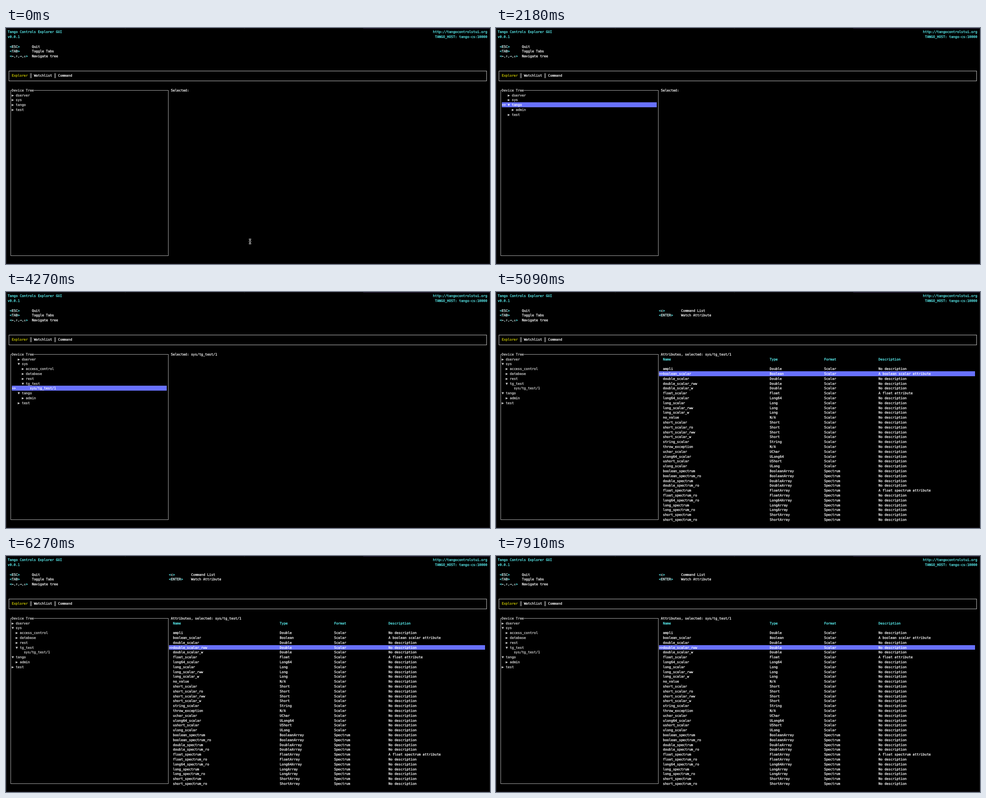
Write an HTML page that moves like this. It is 1069x524 px and loops after 8000 ms.

```html
<!DOCTYPE html>
<html lang="en">
<head>
<meta charset="utf-8">
<title>Tango Controls Explorer GUI</title>
<style>
html, body { margin: 0; width: 100%; height: 100%; overflow: hidden; background: #000; }
svg { display: block; width: 1069px; height: 524px; }
text { font: 7.39px "DejaVu Sans Mono", monospace; white-space: pre; text-rendering: geometricPrecision;
  stroke: currentColor; stroke-width: .25px; fill: currentColor; }
tspan { fill: currentColor; stroke: currentColor; }
</style>
</head>
<body>
<svg id="screen" viewBox="0 0 1069 524"></svg>
<script>
const LOOP = 8000, CW = 4.45, RH = 10.799;
const CYAN = '#60fdff', PALE = '#e0ffff', WHITE = '#fff', GRAY = '#d4d4d4', YELLOW = '#c7c400', BLUE = '#6871ff';
const X = col => 3.8 + CW * col;
const Y = row => 8.7 + RH * row;
const esc = s => s.replace(/&/g, '&amp;').replace(/</g, '&lt;').replace(/>/g, '&gt;');

// Everything is placed on a terminal grid of columns and rows
const putRaw = (col, row, inner, color, end) =>
  `<text x="${X(col)}" y="${Y(row) + 2.6}" color="${color}"${end ? ' text-anchor="end"' : ''}>${inner}</text>`;
const put = (col, row, s, color = WHITE, end = false) => putRaw(col, row, esc(s), color, end);
const putKey = (col, row, key) => putRaw(col, row, `&lt;<tspan color="${PALE}">${key}</tspan>&gt;`, CYAN);
const rect = (x, y, w, h, color) => `<rect x="${x}" y="${y}" width="${w}" height="${h}" fill="${color}"/>`;
const bar = (c0, c1, row) => {
  const [x0, x1, y0, y1] = [X(c0), X(c1), Y(row - .5), Y(row + .5)].map(Math.round);
  return rect(x0, y0, x1 - x0, y1 - y0, BLUE);
};
const snap = v => Math.round(v) + .5;
const frame = (c0, r0, c1, r1, color) => {
  const x = snap(X(c0 + .5)), y = snap(Y(r0));
  return `<rect x="${x}" y="${y}" width="${snap(X(c1 + .5)) - x}" height="${snap(Y(r1)) - y}" fill="none" stroke="${color}"/>`;
};

const TREE = [
  ['dserver', 0], ['sys', 0],
  ['access_control', 1, 'sys'], ['database', 1, 'sys'], ['rest', 1, 'sys'], ['tg_test', 1, 'sys'],
  ['sys/tg_test/1', 2, 'tg_test'],
  ['tango', 0], ['admin', 1, 'tango'], ['test', 0]
];

const SCALARS = `ampli boolean_scalar double_scalar double_scalar_rww double_scalar_w float_scalar
  long64_scalar long_scalar long_scalar_rww long_scalar_w no_value short_scalar short_scalar_ro
  short_scalar_rww short_scalar_w string_scalar throw_exception uchar_scalar ulong64_scalar
  ushort_scalar ulong_scalar`.split(/\s+/);
const SPECTRA = `boolean_spectrum boolean_spectrum_ro double_spectrum double_spectrum_ro
  float_spectrum float_spectrum_ro long64_spectrum_ro long_spectrum long_spectrum_ro
  short_spectrum short_spectrum_ro`.split(/\s+/);
const TYPES = { ampli: 'Double', no: 'N/A', throw: 'N/A', uchar: 'UChar', ulong64: 'ULong64', ushort: 'UShort', ulong: 'ULong' };
const NOTES = {
  boolean_scalar: 'A boolean scalar attribute',
  float_scalar: 'A float attribute',
  float_spectrum: 'A float spectrum attribute'
};

// Each step changes part of the state from its time on
const STEPS = [
  [0, { tab: 0, open: [], node: '', attr: -1, cursor: true, value: '254.11903842716052' }],
  [90, { node: 'dserver', cursor: false }],
  [180, { node: 'sys' }],
  [360, { node: 'tango' }],
  [550, { open: ['tango'] }],
  [1000, { node: 'admin' }],
  [2180, { node: 'tango' }],
  [2640, { node: 'sys' }],
  [2910, { open: ['tango', 'sys'] }],
  [3270, { node: 'access_control' }],
  [3450, { node: 'database' }],
  [3550, { node: 'rest' }],
  [3730, { node: 'tg_test' }],
  [3910, { open: ['tango', 'sys', 'tg_test'] }],
  [4270, { node: 'sys/tg_test/1' }],
  [4550, { node: '', attr: 0 }],
  [5000, { attr: 1 }],
  [5180, { attr: 2 }],
  [5450, { attr: 3 }],
  [5640, { attr: 4 }],
  [5730, { attr: 5 }],
  [6000, { attr: 4 }],
  [6180, { attr: 3 }],
  [6450, { tab: 1 }],
  [6730, { value: '255.02581475263761' }],
  [7730, { tab: 2 }],
  [7910, { tab: 0 }]
];

function header(s) {
  const keys = (col, gap, list) => list.map(([key, label], i) =>
    putKey(col, 3 + i, key) + put(col + gap, 3 + i, label)).join('');
  const left = [['ESC', 'Quit'], ['TAB', 'Toggle Tabs']];
  if (s.tab !== 1) left.push(['←,↑,→,↓', 'Navigate tree']);
  let out = put(0, 0, 'Tango Controls Explorer GUI', CYAN) + put(0, 1, 'v0.0.1', CYAN) +
    put(238, 0, 'http://tangocontrolstui.org', CYAN, true) +
    put(238, 1, 'TANGO_HOST: tango-cs:10000', CYAN, true) + keys(1, 11, left);
  if (s.tab === 0 && s.attr >= 0)
    out += keys(80, 11, [['c', 'Command List'], ['ENTER', 'Watch Attribute']]);
  out += frame(0, 8, 237, 10, '#c0c0c0');
  [['Explorer', 2], ['Watchlist', 13], ['Command', 25]].forEach(([name, col], i) => {
    out += put(col, 9, name, i === s.tab ? YELLOW : WHITE);
    if (i) for (const dx of [-1.5, .7]) out += rect(X(col - 1.5) + dx, 100.5, .9, RH, GRAY);
  });
  return out;
}

function tree(s) {
  let out = frame(1, 12, 79, 46, '#a8a8a8') + rect(X(2), 133, CW * 11, RH, '#000') + put(2, 12, 'Device Tree', GRAY);
  const shown = TREE.filter(([, , parent]) => !parent || s.open.includes(parent));
  shown.forEach(([name, depth], i) => {
    const row = 13 + i, on = name === s.node;
    const mark = depth === 2 ? ' ' : s.open.includes(name) ? '▼' : '▶';
    const col = 2 + (s.node ? 3 : 0) + depth * 2, color = on ? WHITE : GRAY;
    if (on) out += bar(2, 79, row) + put(2, row, '>>');
    out += put(col, row, mark, color) + put(col + 2, row, name, color);
  });
  return out;
}

function attributes(s) {
  const cols = [82, 135, 162, 189];
  const line = (row, cells, color) => cells.map((c, i) => put(cols[i], row, c, color)).join('');
  let out = put(81, 12, 'Attributes, selected: sys/tg_test/1') +
    line(13, ['Name', 'Type', 'Format', 'Description'], CYAN);
  [...SCALARS, ...SPECTRA].forEach((name, i) => {
    const base = name.split('_')[0], list = i >= SCALARS.length;
    const type = (TYPES[base] || base[0].toUpperCase() + base.slice(1)) + (list ? 'Array' : '');
    if (i === s.attr) out += bar(80, 237, 15 + i) + put(80, 15 + i, '>>');
    out += line(15 + i, [name, type, list ? 'Spectrum' : 'Scalar', NOTES[name] || 'No description']);
  });
  return out;
}

const explorer = s => tree(s) + (s.attr >= 0 ? attributes(s)
  : put(81, 12, 'Selected:' + (s.node.includes('/') ? ' ' + s.node : '')));

const watchlist = s => [['Device', 'sys/tg_test/1'], ['Attribute', 'double_scalar_rww'], ['Value', s.value]]
  .map(([title, value], i) => put(i * 40, 12, title, CYAN) + put(i * 40, 14, value)).join('');

const command = () => frame(0, 11, 237, 47, '#c0c0c0');

const edges = rect(0, 0, 1069, 1, '#1d1922') + rect(789, 0, 280, 1, '#43355a') +
  rect(263, 0, 1, 1, '#444') + rect(526, 0, 1, 1, '#444') +
  rect(0, 0, 1.5, 524, '#1c1c20') + rect(1068, 0, 1, 524, '#1c1c20') + rect(0, 523, 1069, 1, '#1d1922');

const pointer = '<path d="M536.5 468.5h5M536.5 479.5h5M537 469l2 3v4l-2 3M541 469l-2 3v4l2 3" fill="none" stroke="#ddd"/>' +
  '<circle cx="539" cy="474" r="2" fill="#000" stroke="#ddd"/>';

const screen = document.getElementById('screen');
let last = -1;
function draw(now) {
  const t = now % LOOP;
  const n = STEPS.filter(([at]) => at <= t).length;
  if (n !== last) {
    last = n;
    const s = Object.assign({}, ...STEPS.slice(0, n).map(step => step[1]));
    screen.innerHTML = edges + header(s) + [explorer, watchlist, command][s.tab](s) + (s.cursor ? pointer : '');
  }
}
const start = performance.now();
function tick() {
  draw(performance.now() - start);
  requestAnimationFrame(tick);
}
tick();
</script>
</body>
</html>
```
